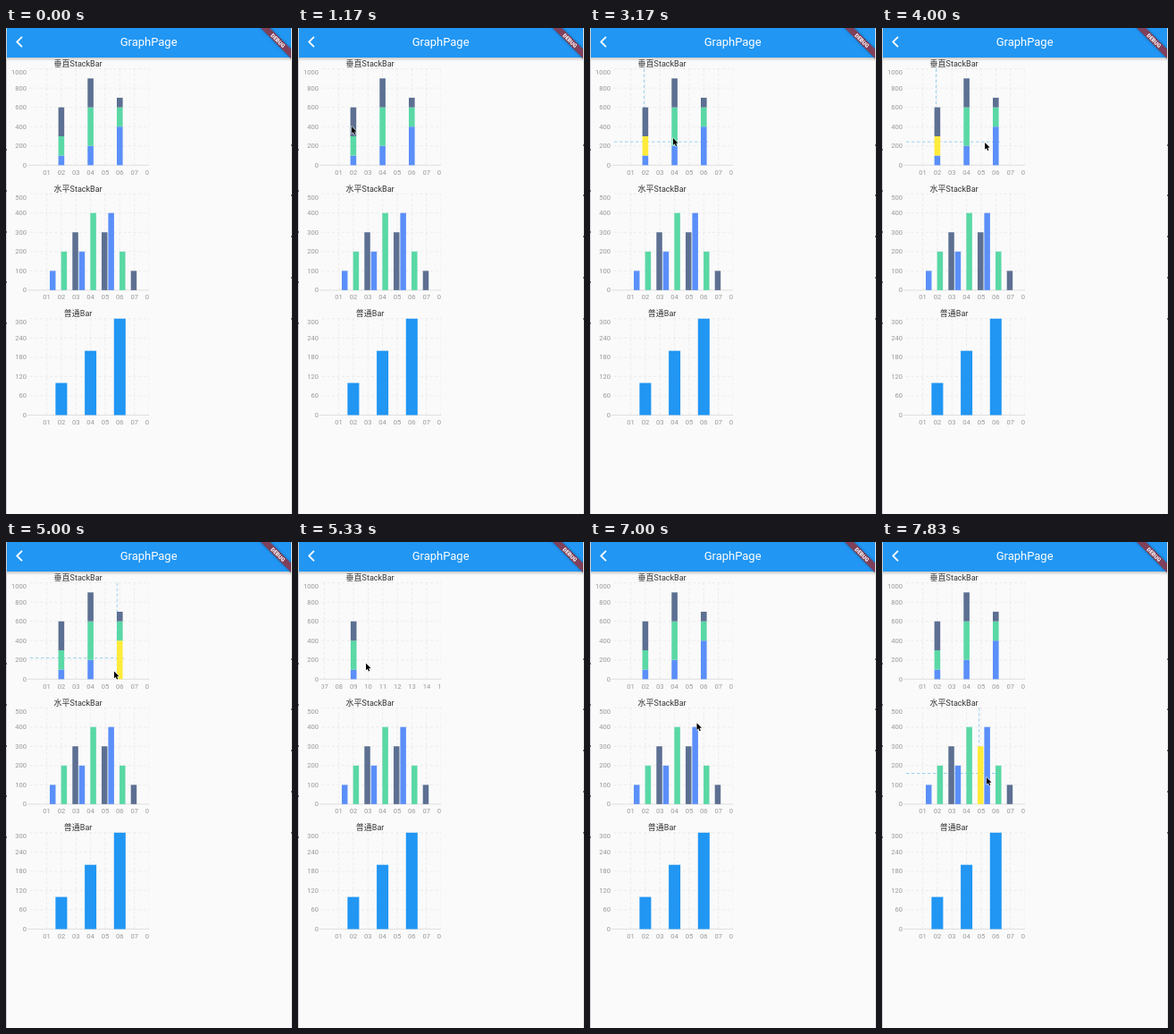
An HTML page with a canvas that plays this animation: 320 by 543 pixels, repeating every 8000 ms.

```html
<!DOCTYPE html>
<html lang="zh">
<head>
<meta charset="utf-8">
<title>GraphPage</title>
<style>
html, body { margin: 0; width: 100%; height: 100%; overflow: hidden; background: #fafafa; }
canvas { display: block; width: 320px; height: 543px; }
</style>
</head>
<body>
<canvas id="stage"></canvas>
<script>
const W = 320, H = 543, LOOP = 8000, STEPS = 48;
const canvas = document.getElementById('stage');
const ctx = canvas.getContext('2d');
const ratio = window.devicePixelRatio || 1;
canvas.width = W * ratio;
canvas.height = H * ratio;

const FONT = "Roboto, 'Noto Sans CJK SC', 'Noto Sans CJK', sans-serif";
const BLUE = '#2196f3', YELLOW = '#ffeb3b', GRID = '#e6e6e6', AXIS = '#d9d9d9', MARK = '#90cbec';
const SERIES = ['#5b8ff9', '#5ad8a6', '#5d7092'];
const LEFT = 27, RIGHT = 160, UNIT = 16.35, ROW = 21.55;

const DATA = { 2: [100, 200, 300], 4: [200, 400, 300], 6: [400, 200, 100], 9: [100, 300, 200] };

const CHARTS = [
  { title: '垂直StackBar', tick: 200, kind: 'stack' },
  { title: '水平StackBar', tick: 100, kind: 'group' },
  { title: '普通Bar', tick: 60, kind: 'plain' }
].map((chart, i) => ({ ...chart, base: 153.3 + 139.6 * i }));

// Touch marks: chart, time span in steps, crosshair point, highlighted bar
const MARKS = [
  { chart: 0, from: 12, to: 26, x: 60.5, y: 127.2, day: 2, part: 1 },
  { chart: 0, from: 26, to: 31, x: 124.3, y: 129.6, day: 6, part: 0 },
  { chart: 1, from: 45, to: 48, x: 108.7, y: 258.5, day: 4, part: 2 }
];

// Pointer stops: step, x, y
const STOPS = [
  [4, 150, 240], [7, 60, 110], [12, 60, 122], [19, 93, 123], [26, 124, 130],
  [30, 121, 144.5], [32, 76, 135.5], [41, 120, 190], [47, 117, 263]
];

const clamp = k => Math.min(1, Math.max(0, k));
const mix = (a, b, k) => a + (b - a) * k;

function pointerAt(n) {
  const i = Math.max(1, STOPS.findIndex(stop => n <= stop[0]));
  const [t0, x0, y0] = STOPS[i - 1], [t1, x1, y1] = STOPS[i];
  const k = clamp((n - t0) / (t1 - t0));
  return [mix(x0, x1, k), mix(y0, y1, k)];
}

// A fling that slows down, then a smooth drag back
function scrollAt(n) {
  const fling = 1 - (1 - clamp((n - 30) / 4)) ** 3.55;
  const back = clamp((n - 38) / 3);
  return -124.8 * fling * (1 - back * back * (3 - 2 * back));
}

function rect(x, y, w, h, color) {
  ctx.fillStyle = color;
  ctx.fillRect(x, y, w, h);
}

function line(x1, y1, x2, y2, color, width, dash = []) {
  ctx.strokeStyle = color;
  ctx.lineWidth = width;
  ctx.setLineDash(dash);
  ctx.beginPath();
  ctx.moveTo(x1, y1);
  ctx.lineTo(x2, y2);
  ctx.stroke();
  ctx.setLineDash([]);
}

function label(text, x, y, size, color, align = 'center', weight = 400) {
  ctx.font = `${weight} ${size}px ${FONT}`;
  ctx.textAlign = align;
  ctx.fillStyle = color;
  ctx.fillText(text, x, y);
}

function drawBars(chart, day, x, mark) {
  const scale = ROW / chart.tick;
  const hit = mark && mark.day === day ? mark.part : -1;
  if (chart.kind === 'plain') {
    const h = day * 50 * scale;
    rect(x - 6.5, chart.base - h, 13, h, BLUE);
    return;
  }
  let top = chart.base;
  DATA[day].forEach((value, i) => {
    const h = value * scale;
    const color = i === hit ? YELLOW : SERIES[i];
    if (chart.kind === 'stack') {
      top -= h;
      rect(x - 3.3, top, 6.6, h, color);
    } else {
      rect(x - 12.9 + 12.65 * i, chart.base - h, 6.5, h, color);
    }
  });
}

function drawChart(chart, shift, mark) {
  const { base, tick, kind } = chart;
  const top = base - ROW * 5;
  label(chart.title, 80.6, base - 110.2, 9, '#333');

  for (let i = 0; i <= 5; i++) {
    const y = base - ROW * i;
    label(i * tick, 23, y + (i === 5 ? 6.6 : 2.5), 7.6, '#999', 'right');
    if (i) line(LEFT, y, RIGHT, y, GRID, 0.7, [3, 2.5]);
  }
  line(24, base, RIGHT, base, AXIS, 0.8);

  ctx.save();
  ctx.beginPath();
  ctx.rect(LEFT - 0.5, top - 1, RIGHT - LEFT + 0.5, 122);
  ctx.clip();
  const place = day => 29.2 + UNIT * day + shift;
  for (let day = 1; day <= 16; day++) {
    line(place(day), top, place(day), base, GRID, 0.7, [3, 2.5]);
    label(String(day).padStart(2, '0'), place(day), base + 10.4, 7.6, '#999');
  }
  if (mark) {
    line(LEFT, mark.y, 132, mark.y, MARK, 0.9, [3.5, 2.5]);
    line(mark.x, top, mark.x, base, MARK, 0.9, [3.5, 2.5]);
  }
  for (const day of Object.keys(DATA).map(Number)) {
    if (day < 9 || kind === 'stack') drawBars(chart, day, place(day), mark);
  }
  ctx.restore();
}

function drawHeader() {
  const shade = ctx.createLinearGradient(0, 33, 0, 37);
  shade.addColorStop(0, 'rgba(0,0,0,0.2)');
  shade.addColorStop(1, 'rgba(0,0,0,0)');
  rect(0, 33, W, 4, shade);
  rect(0, 0, W, 33, BLUE);
  label('GraphPage', 159.6, 20.2, 13, '#fff');
  ctx.strokeStyle = '#fff';
  ctx.lineWidth = 1.8;
  ctx.beginPath();
  ctx.moveTo(18, 9.8);
  ctx.lineTo(12.3, 15.5);
  ctx.lineTo(18, 21.2);
  ctx.stroke();

  ctx.save();
  ctx.translate(W - 1, 0);
  ctx.rotate(Math.PI / 4);
  ctx.shadowColor = 'rgba(0,0,0,0.4)';
  ctx.shadowBlur = 3 * ratio;
  rect(-26, 16.8, 52, 7.2, '#80405a');
  ctx.shadowColor = 'transparent';
  label('DEBUG', -0.5, 22.5, 6.1, '#fff', 'center', 900);
  ctx.restore();
}

// Thin window borders with a few dark specks
function drawEdges() {
  rect(0, 0, 1, H, '#cfd1d3');
  rect(W - 1, 0, 1, H, '#dfe1e3');
  for (let i = 0; i < 10; i++) {
    const y = 130 + (i * 97) % 240;
    rect(i % 2 ? 0 : W - 1, y, 1, 2, '#666');
  }
}

function drawPointer(x, y) {
  const shape = [[0, 0], [0, 7.8], [1.8, 6.2], [3, 9], [4.3, 8.5], [3.1, 5.7], [5.5, 5.5]];
  ctx.beginPath();
  shape.forEach(([dx, dy]) => ctx.lineTo(x + dx, y + dy));
  ctx.closePath();
  ctx.lineJoin = 'round';
  ctx.strokeStyle = 'rgba(255,255,255,0.8)';
  ctx.lineWidth = 1.2;
  ctx.stroke();
  ctx.fillStyle = '#000';
  ctx.fill();
}

function draw(time) {
  // Screen updates six times a second; the margin absorbs rounded times
  const n = Math.floor((time % LOOP) / LOOP * STEPS + 0.05) % STEPS;
  ctx.setTransform(ratio, 0, 0, ratio, 0, 0);
  rect(0, 0, W, H, '#fafafa');
  CHARTS.forEach((chart, i) => {
    const mark = MARKS.find(m => m.chart === i && n >= m.from && n < m.to);
    drawChart(chart, i ? 0 : scrollAt(n), mark);
  });
  drawHeader();
  drawEdges();
  if (n >= 4 && (n < 36 || n > 38)) drawPointer(...pointerAt(n));
}

const start = performance.now();
function loop() {
  draw(performance.now() - start);
  requestAnimationFrame(loop);
}
loop();
</script>
</body>
</html>
```
